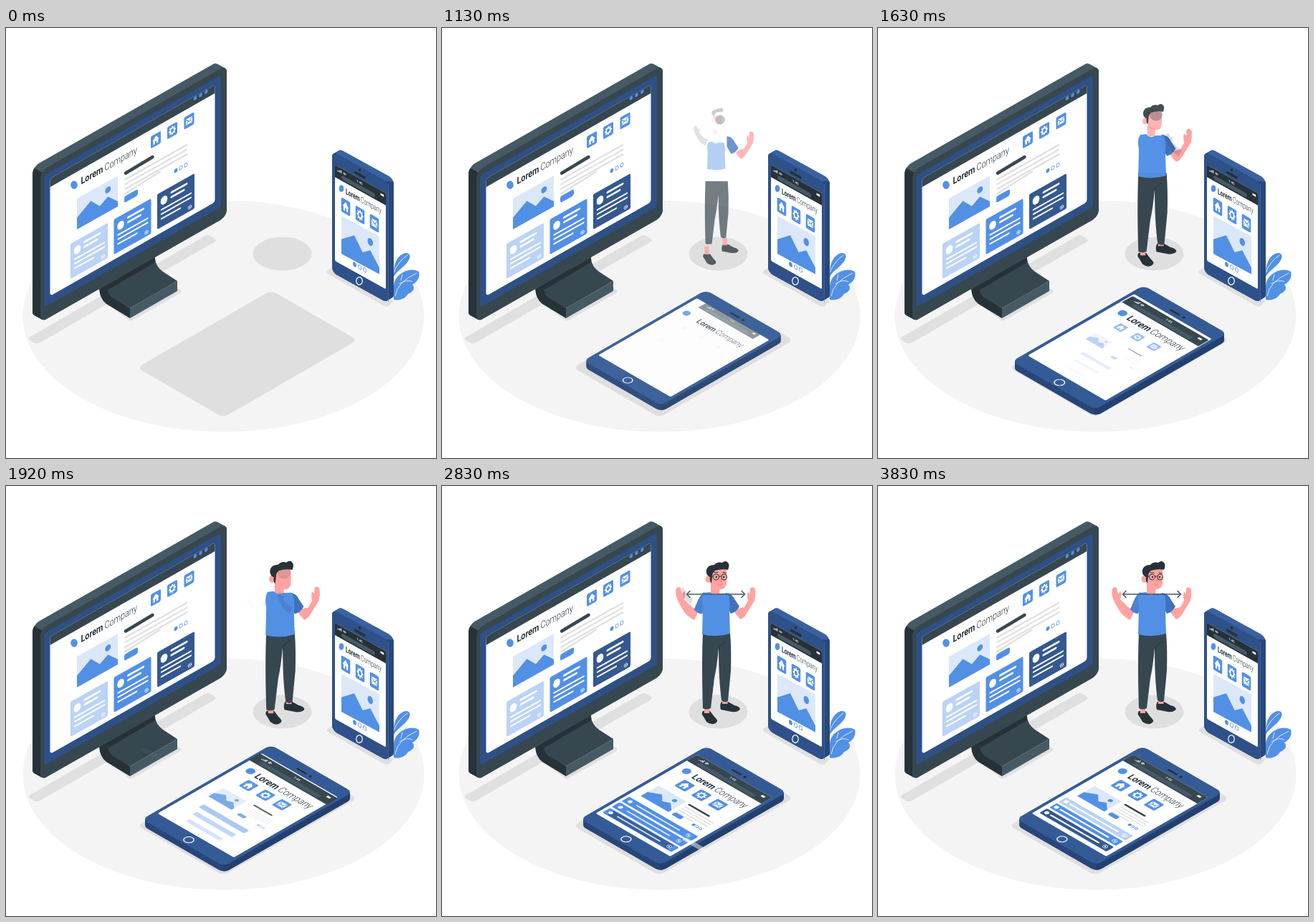
Recreate the animation shown at these times as an HTML page with a canvas. Size 600 by 600 pixels, loop 3.96 s.

```html
<!DOCTYPE html>
<html lang="en">
<head>
<meta charset="utf-8">
<title>Responsive design</title>
<style>
html, body { margin: 0; width: 100%; height: 100%; overflow: hidden; background: #fff; }
canvas { display: block; width: 600px; height: 600px; }
</style>
</head>
<body>
<canvas id="stage" width="600" height="600"></canvas>
<script>
const LOOP = 3960;
const BLUE = '#5290e6', LIGHT = '#bbd3f6', PALE = '#dce8fa', NAVY = '#34588f';
const INK = '#263238', SLATE = '#37474f', STEEL = '#455a64', GREY = '#e0e0e0', SKIN = '#ffa3a1';
const canvas = document.getElementById('stage');
const main = canvas.getContext('2d');
const layer = document.createElement('canvas');
layer.width = layer.height = 600;
const layerCtx = layer.getContext('2d');
let ctx = main, now = 0;

// Piecewise linear value from [time, value] pairs
function at(t, keys) {
  if (t <= keys[0][0]) return keys[0][1];
  for (let i = 1; i < keys.length; i++) {
    const [t1, v1] = keys[i], [t0, v0] = keys[i - 1];
    if (t <= t1) return v0 + (v1 - v0) * (t - t0) / (t1 - t0);
  }
  return keys[keys.length - 1][1];
}
const GROW = [[0, .03], [540, .48], [790, .7], [1130, .97], [1350, 1.03], [1630, 1.045], [1850, 1.03], [2120, 1]];
const FADE = [[120, 0], [400, .08], [540, .2], [790, .5], [1130, .94], [1300, 1]];

// Drawing helpers
function poly(color, ...p) {
  ctx.beginPath();
  for (let i = 0; i < p.length; i += 2) ctx.lineTo(p[i], p[i + 1]);
  ctx.closePath();
  ctx.fillStyle = color;
  ctx.fill();
}
function shape(color, d) { ctx.fillStyle = color; ctx.fill(new Path2D(d)); }
function rect(color, x, y, w, h, r = 0) {
  ctx.beginPath();
  ctx.roundRect(x, y, w, h, r);
  ctx.fillStyle = color;
  ctx.fill();
}
function oval(color, x, y, rx, ry = rx) {
  ctx.beginPath();
  ctx.ellipse(x, y, rx, ry, 0, 0, 7);
  ctx.fillStyle = color;
  ctx.fill();
}
function ring(color, x, y, rx, ry, w) {
  ctx.beginPath();
  ctx.ellipse(x, y, rx, ry, 0, 0, 7);
  ctx.strokeStyle = color;
  ctx.lineWidth = w;
  ctx.stroke();
}
function line(color, w, ...p) {
  ctx.beginPath();
  for (let i = 0; i < p.length; i += 2) ctx.lineTo(p[i], p[i + 1]);
  ctx.strokeStyle = color;
  ctx.lineWidth = w;
  ctx.lineCap = ctx.lineJoin = 'round';
  ctx.stroke();
}
function curve(color, w, d) {
  ctx.strokeStyle = color;
  ctx.lineWidth = w;
  ctx.lineCap = ctx.lineJoin = 'round';
  ctx.stroke(new Path2D(d));
}
function plane(m, draw) {
  ctx.save();
  ctx.transform(...m);
  draw();
  ctx.restore();
}
const wall = (x, y, slope) => [1, slope, 0, 1, x, y];
const floor = (x, y) => [.866, .5, -.866, .5, x, y];
const onTablet = (u, v) => [369 + .866 * (u - v), 363 + .5 * (u + v)];

// Grows and fades a part in around its own centre
function pop(x, y, start, draw) {
  const a = at(now - start, FADE), s = at(now - start, GROW);
  if (a <= 0) return;
  if (a < 1) {
    ctx = layerCtx;
    ctx.clearRect(0, 0, 600, 600);
  }
  ctx.save();
  ctx.translate(x, y);
  ctx.scale(s, s);
  ctx.translate(-x, -y);
  draw();
  ctx.restore();
  ctx = main;
  if (a < 1) {
    ctx.globalAlpha = a;
    ctx.drawImage(layer, 0, 0);
    ctx.globalAlpha = 1;
  }
}
function popTablet(u, v, start, draw) {
  pop(...onTablet(u, v), start, () => plane(floor(369, 363), draw));
}

// Page pieces
function brand(x, y, size, narrow) {
  ctx.save();
  ctx.translate(x, y);
  ctx.scale(narrow, 1);
  ctx.fillStyle = INK;
  ctx.font = `700 ${size}px Roboto, sans-serif`;
  ctx.fillText('Lorem', 0, 0);
  const w = ctx.measureText('Lorem').width + size * .2;
  ctx.font = `300 ${size}px Roboto, sans-serif`;
  ctx.fillText('Company', w, 0);
  ctx.restore();
}
function picture(x, y, w, h) {
  rect(PALE, x, y, w, h);
  const pts = [0, .62, .34, .33, .56, .66, .76, .5, 1, .83, 1, 1, 0, 1];
  poly(BLUE, ...pts.map((p, i) => i % 2 ? y + p * h : x + p * w));
  oval(BLUE, x + .76 * w, y + .28 * h, .07 * w, .1 * h);
}
function icon(kind, x, y, w, h) {
  rect(BLUE, x - w / 2, y - h / 2, w, h, 2);
  ctx.save();
  ctx.translate(x, y);
  ctx.scale(w / 16, h / 16);
  if (kind === 0) {
    poly('#fff', -5.5, .3, 0, -5.5, 5.5, .3, 4, .3, 4, 5, 1.2, 5, 1.2, 1.5, -1.2, 1.5, -1.2, 5, -4, 5, -4, .3);
  } else if (kind === 1) {
    ring('#fff', 0, 0, 3.4, 3.4, 2);
    for (let i = 0; i < 8; i++) {
      const c = Math.cos(i * Math.PI / 4), s = Math.sin(i * Math.PI / 4);
      line('#fff', 1.8, 4 * c, 4 * s, 5 * c, 5 * s);
    }
  } else {
    rect('#fff', -5.2, -4, 10.4, 8, .6);
    line(BLUE, 1, -4.6, -3, 0, .8, 4.6, -3);
    line(BLUE, .8, -4.4, 3, -1.6, .2);
    line(BLUE, .8, 4.4, 3, 1.6, .2);
  }
  ctx.restore();
}
function dots(x, y, gap, rx, ry) {
  oval(BLUE, x, y, rx + .4, ry + .4);
  for (const i of [1, 2]) ring(BLUE, x + gap * i, y, rx, ry, .8);
}
function badge(x, y, r) {
  ring('#fff', x, y, r, r, .7);
  oval('#fff', x, y, r * .4);
}
function card(x, y, color) {
  plane(wall(x, y, -.56), () => {
    rect(color, 0, 0, 52, 49, 2);
    oval('#fff', 9.5, 13.5, 4.8, 5.8);
    line('#fff', 3, 20, 8.5, 41, 8.5);
    line('#fff', 3, 20, 15, 37, 15);
    line('#fff', 2.2, 6, 25, 47, 25);
    line('#fff', 2.2, 6, 31, 47, 31);
    line('#fff', 2.2, 6, 37.5, 32, 37.5);
    badge(45.5, 43.5, 2.4);
  });
}
function status(x, y, s, battery, clock) {
  for (let i = 0; i < 4; i++) rect('#fff', x + i * 1.8 * s, y - (1 + i) * s, 1.1 * s, (1 + i) * s);
  for (const r of [1.2, 2.8]) {
    ctx.beginPath();
    ctx.arc(x + 11 * s, y, r * s, -2.4, -.74);
    ctx.strokeStyle = '#fff';
    ctx.lineWidth = s * .9;
    ctx.stroke();
  }
  rect('#fff', battery, y - 3 * s, 5 * s, 3 * s, .5);
  ctx.fillStyle = '#fff';
  ctx.font = `500 ${4.6 * s}px Roboto, sans-serif`;
  ctx.fillText('1:45', clock, y);
}

// Static scene
function ground() {
  oval('#f4f4f4', 303.5, 402, 280, 161.5);
  plane(floor(290, 291), () => rect(GREY, -8, 2, 16, 291, 5));
  shape(GREY, 'M130 376L172 408Q175 409 178 407L243 370Q246 367 243 365L208 343Z');
  oval('#dfdfdf', 385.5, 315, 41, 23.5);
  plane(floor(370, 366), () => rect('#dfdfdf', 0, 0, 139, 216, 8));
  shape(GREY, 'M449 338L458 333L541 381L534 388Q531 390 526 387L449 343Q446 341 449 338Z');
}
function extrude(x, y, slope, w, h, r, dx, dy, color) {
  for (let i = 0; i <= 1.001; i += .1) {
    plane(wall(x + dx * i, y + dy * i, slope), () => rect(color, 0, 0, w, h, r));
  }
}
function monitor() {
  shape(INK, 'M130 364L208 319L208 330L146 366L148 374L173 391L173 405L140 385Q131 378 130 364Z');
  shape(SLATE, 'M142 362L208 322Q209 333 219 340L239 353L173 391L148 376Q142 371 142 362Z');
  poly(INK, 142, 357, 208, 319, 208, 327, 143, 365);
  poly(STEEL, 173, 391, 239, 353, 239, 367, 173, 405);

  extrude(48, 200, -.57, 260, 211, 9, -11, -6, STEEL);
  ctx.save();
  ctx.beginPath();
  ctx.moveTo(30, 190);
  ctx.lineTo(50, 202);
  ctx.lineTo(56, 420);
  ctx.lineTo(30, 420);
  ctx.clip();
  extrude(48, 200, -.57, 260, 211, 9, -11, -6, INK);
  ctx.restore();
  plane(wall(48, 200, -.57), () => rect(SLATE, 0, 0, 260, 211, 9));
  plane(wall(53, 206, -.57), () => rect('#2e5085', 0, 0, 247, 184, 4));

  plane(wall(61.5, 210, -.57), () => {
    rect('#fff', 0, 0, 230, 164, 4);
    rect(SLATE, 0, 0, 230, 12, [4, 4, 0, 0]);
    for (const u of [202.5, 210, 217.8]) oval(BLUE, u, 3.2, 2.3, 2.6);
  });
  oval(BLUE, 95, 219, 4.8, 5.8);
  plane(wall(104.5, 218.5, -.565), () => brand(0, 0, 13.8, .78));
  [[209, 156], [232, 143], [255.5, 129.5]].forEach(([x, y], i) =>
    plane(wall(x, y, -.57), () => icon(i, 0, 0, 14, 17)));
  plane(wall(99, 238, -.56), () => picture(0, 0, 57, 43));

  line(SLATE, 4.4, 167, 202.5, 204.5, 180);
  for (let i = 0; i < 3; i++) line(GREY, 2.2, 166, 211.5 + i * 6.6, 252.5, 163 + i * 6.6);
  line(GREY, 2.2, 166, 231.3, 215, 200.5);
  plane(wall(165, 235, -.55), () => rect(BLUE, 0, 0, 19, 9, 2.5));
  plane(wall(237, 199, -.57), () => dots(0, 0, 7, 2.1, 2.5));
  card(90, 301, LIGHT);
  card(150.5, 267, BLUE);
  card(211, 232, NAVY);
}
function leaves() {
  shape(BLUE, 'M541 347C540 330 546 317 557 314C564 313 565 319 562 324C556 334 547 337 541 347Z');
  shape(BLUE, 'M541 379C548 381 557 378 561 371C571 367 570 361 567 358C575 354 578 346 576 340C570 336 560 337 554 341C547 345 542 350 541 360Z');
  curve('#fff', .8, 'M541 341Q547 326 560 317M543 374Q546 354 573 342M549 357Q559 350 567 354M551 352L553 344');
}
function phone() {
  leaves();
  extrude(455, 172, .55, 78, 169, 7, 8, -4.6, '#3a62a0');
  ctx.save();
  ctx.beginPath();
  ctx.rect(530, 214, 20, 180);
  ctx.clip();
  extrude(455, 172, .55, 78, 169, 7, 8, -4.6, '#29487a');
  ctx.restore();
  plane(wall(455, 172, .55), () => rect('#2f5189', 0, 0, 78, 169, 7));
  line('#4a74b4', .6, 533.5, 218, 533.5, 382);
  line(INK, 3.6, 487.5, 201.5, 500, 208.5);
  oval(INK, 493.5, 198, 1.7, 2);
  plane(wall(459, 191, .555), () => {
    rect('#fff', 0, 0, 71, 134, 2);
    rect(INK, 0, 0, 71, 17, [2, 2, 0, 0]);
    rect(STEEL, 9, 9.2, 47, 6, 3);
    status(3, 6.8, .95, 63.5, 30);
  });
  oval(BLUE, 468, 224, 3.3, 4.8);
  plane(wall(474, 231.5, .55), () => brand(0, 0, 11.2, .61));
  [[474, 249.5], [494, 261], [514, 272.5]].forEach(([x, y], i) =>
    plane(wall(x, y, .56), () => icon(i, 0, 0, 12.5, 20)));
  plane(wall(468, 262, .54), () => picture(0, 0, 53, 53));
  plane(wall(486.5, 330, .55), () => dots(0, 0, 7, 2.1, 2.9));
  ring('#fff', 493, 353, 4.3, 5.3, 1.2);
}

// Tablet and its contents
function tabletBody() {
  for (let i = 9; i >= 1; i--) plane(floor(369, 363 + i), () => rect('#28467a', 0, 0, 129, 203, 8));
  ctx.save();
  ctx.beginPath();
  ctx.rect(304, 400, 200, 160);
  ctx.clip();
  for (let i = 9; i >= 1; i--) plane(floor(369, 363 + i), () => rect('#23406f', 0, 0, 129, 203, 8));
  ctx.restore();
  plane(floor(369, 363), () => {
    rect('#355b96', 0, 0, 129, 203, 8);
    line(INK, 2.6, 54, 12, 67, 12);
    oval(INK, 74, 12, 1.9);
    rect('#fff', 4.5, 19, 120, 164, 2);
    ring('#fff', 65, 194.5, 5.7, 5.7, 1.2);
  });
}
function tablet() {
  pop(337, 451, 0, tabletBody);
  popTablet(64, 27, 300, () => {
    rect(SLATE, 4.5, 19, 120, 17, [2, 2, 0, 0]);
    rect(STEEL, 17, 28, 92, 6, 3);
    status(13, 26, 1.05, 113, 62);
  });
  popTablet(19, 51, 130, () => oval(BLUE, 19, 51, 5.4));
  popTablet(75, 52, 170, () => brand(31, 56.5, 14, .84));
  [37.5, 64.5, 91].forEach((u, i) => popTablet(u, 72.5, 780, () => icon(i, u, 72.5, 17, 17)));
  popTablet(38, 108, 930, () => picture(17, 94, 43.5, 28));
  popTablet(83, 95.5, 900, () => line(SLATE, 2.8, 68, 95.5, 99, 95.5));
  popTablet(90, 108, 1050, () => {
    for (let i = 0; i < 4; i++) line(GREY, 1.6, 68, 102 + i * 4.6, i < 3 ? 112 : 93, 102 + i * 4.6);
  });
  popTablet(74, 120, 960, () => rect(BLUE, 67, 117, 14, 6.5, 2));
  popTablet(104, 120, 1050, () => dots(99.5, 120, 5.3, 1.8, 1.8));

  [133, 148.5, 164].forEach((v, i) => {
    const bar = color => rect(color, 10.5, v, 107, 12, 1.5);
    popTablet(64, v + 6, 1150 + i * 100, () => bar(BLUE));
    if (i === 0) {
      ctx.globalAlpha = at(now, [[2850, 0], [3500, 1]]);
      plane(floor(369, 363), () => bar(LIGHT));
      ctx.globalAlpha = 1;
    }
    if (i === 2) popTablet(64, v + 6, 1780, () => bar(NAVY));
    popTablet(16, v + 6, 1700, () => oval('#fff', 16, v + 6, 2.9));
    popTablet(61, v + 6, 1800, () => line('#fff', 2.3, 23, v + 6, 99, v + 6));
    popTablet(110, v + 6, 1650, () => badge(110, v + 6, 3));
  });
  drift();
}
// Pale strip that slides across the tablet
function drift() {
  const a = at(now, [[1900, 0], [2290, .5], [2830, .5], [3250, 0]]);
  if (!a) return;
  const x = at(now, [[1900, 205], [2290, 258], [2830, 356], [3250, 375]]);
  const y = at(now, [[1900, 375], [2290, 412], [2830, 503], [3250, 515]]);
  ctx.globalAlpha = a;
  plane(floor(x, y), () => rect('#f6f8fb', -22, -4, 40, 7, 3));
  ctx.globalAlpha = 1;
}

// Man
const LEFT_ARM = 'M352 187Q344 183 339 177Q331 165 328 157Q325 149 327 143Q330 140 333 142L335 151L338 147Q341 149 338 158L349 169L358 174Z';
const RIGHT_ARM = 'M408 176L416 186Q422 184 425 178L436 160Q438 152 437 144Q434 139 430 143L430 151L427 148Q425 151 427 160L422 169L414 171Z';
function man() {
  pop(373, 322, 150, () =>
    shape(INK, 'M364 314Q361 318 365 322L369 329Q377 335 383 330Q386 327 380 322L374 314Z'));
  pop(402, 308, 150, () =>
    shape(INK, 'M390 301Q387 306 389 312L404 315Q414 316 416 311Q414 307 408 306L399 301Z'));
  pop(369, 310, 130, () => rect(SKIN, 366, 304, 7, 13));
  pop(395, 299, 130, () => rect(SKIN, 391, 293, 7.5, 11));
  pop(384, 258, 190, () => {
    shape(SLATE, 'M364 204L402 204Q404 230 403 258L399 300Q394 303 390 299Q386 270 386 226Q384 250 380 268L375 310Q369 313 364 310Q362 250 364 204Z');
    curve(INK, .8, 'M386 228Q387 222 396 217');
  });

  pop(381, 145, 600, () => shape(SKIN, 'M375 135L375 150Q380 154 387 151L388 139Z'));
  pop(421, 163, 140, () => shape(SKIN, RIGHT_ARM));
  pop(342, 164, 1560, () => shape(SKIN, LEFT_ARM));
  pop(362, 162, 1500, () =>
    shape('#4a82d2', 'M366 148Q361 151 357 160L352 172Q356 178 363 178L369 164Z'));
  pop(406, 163, 150, () =>
    shape('#3f72bb', 'M396 149Q405 150 409 159L415 168Q411 176 403 178L396 166Z'));
  pop(383, 178, 400, () =>
    shape(BLUE, 'M374 148Q380 155 387 150L398 150Q403 156 401 174L402 206Q383 212 363 207L364 170Q361 155 366 149Z'));

  head();
  ghosts();
  arrow();
}
function head() {
  pop(384, 129, 600, () => {
    shape(SKIN, 'M375 116Q388 112 397 117Q398 128 397 137Q395 144 389 144Q380 144 376 137Z');
    oval(SKIN, 371.5, 130, 4, 4.8);
  });
  pop(384, 118, 560, () =>
    shape(INK, 'M372 126Q368 123 369 117Q371 110 380 110Q384 105 391 107Q396 103 399 107Q402 110 399 117Q391 115 381 118Q377 121 377 126L376 136Q373 133 374 127Z'));
  pop(388, 127, 1500, () => {
    ring(INK, 382.5, 127, 4, 4, 1);
    ring(INK, 393.5, 127, 3.7, 4, 1);
    line(INK, .9, 386.5, 126, 390, 126);
    line(INK, .9, 378.5, 126, 374, 125);
    oval(INK, 383, 127, 1.2);
    oval(INK, 393, 127, 1.2);
  });
  pop(389, 134, 1400, () => {
    curve('#e57373', .8, 'M389 128L390 133L387 133M385 138Q388 139 391 137');
    curve(INK, 1, 'M380 121L385 121M392 121L396 122');
  });
}
// Faint shapes that travel over the man while he assembles
function ghosts() {
  const a = at(now, [[400, 0], [790, .08], [1130, .16], [1630, .2], [2290, .14], [2830, .17], [3350, 0]]);
  if (a) {
    const x = at(now, [[400, 285], [790, 311], [1130, 361], [1630, 413], [2290, 360], [2830, 342], [3350, 341]]);
    const y = at(now, [[400, 136], [790, 141], [1130, 150], [1630, 163], [2290, 163], [2830, 153]]);
    const s = at(now, [[400, .15], [790, .28], [1130, .62], [1630, .7], [2830, .5]]);
    ctx.save();
    ctx.globalAlpha = a;
    ctx.translate(x, y);
    ctx.scale(s, s);
    ctx.translate(-342, -164);
    shape(SLATE, LEFT_ARM);
    ctx.restore();
  }
  ctx.globalAlpha = at(now, [[450, 0], [790, .12], [1130, .3], [1630, .34], [2150, 0]]);
  const r = at(now, [[450, 2], [790, 4], [1130, 6.8], [1630, 9]]);
  oval(SLATE, 388, at(now, [[450, 150], [790, 143], [1130, 128], [1630, 121]]), r, r * .95);
  ctx.globalAlpha = 1;
}
function arrow() {
  pop(382, 151, 1650, () => line(STEEL, 1.6, 342, 151, 422, 151));
  pop(343.5, 151, 1600, () => line(STEEL, 1.6, 346, 146.5, 341.5, 151, 346, 155.5));
  pop(420.5, 151, 1600, () => line(STEEL, 1.6, 418, 146.5, 422.5, 151, 418, 155.5));
}

function frame() {
  now = performance.now() % LOOP;
  ctx.fillStyle = '#fff';
  ctx.fillRect(0, 0, 600, 600);
  ground();
  monitor();
  phone();
  man();
  tablet();
  requestAnimationFrame(frame);
}
frame();
</script>
</body>
</html>
```
